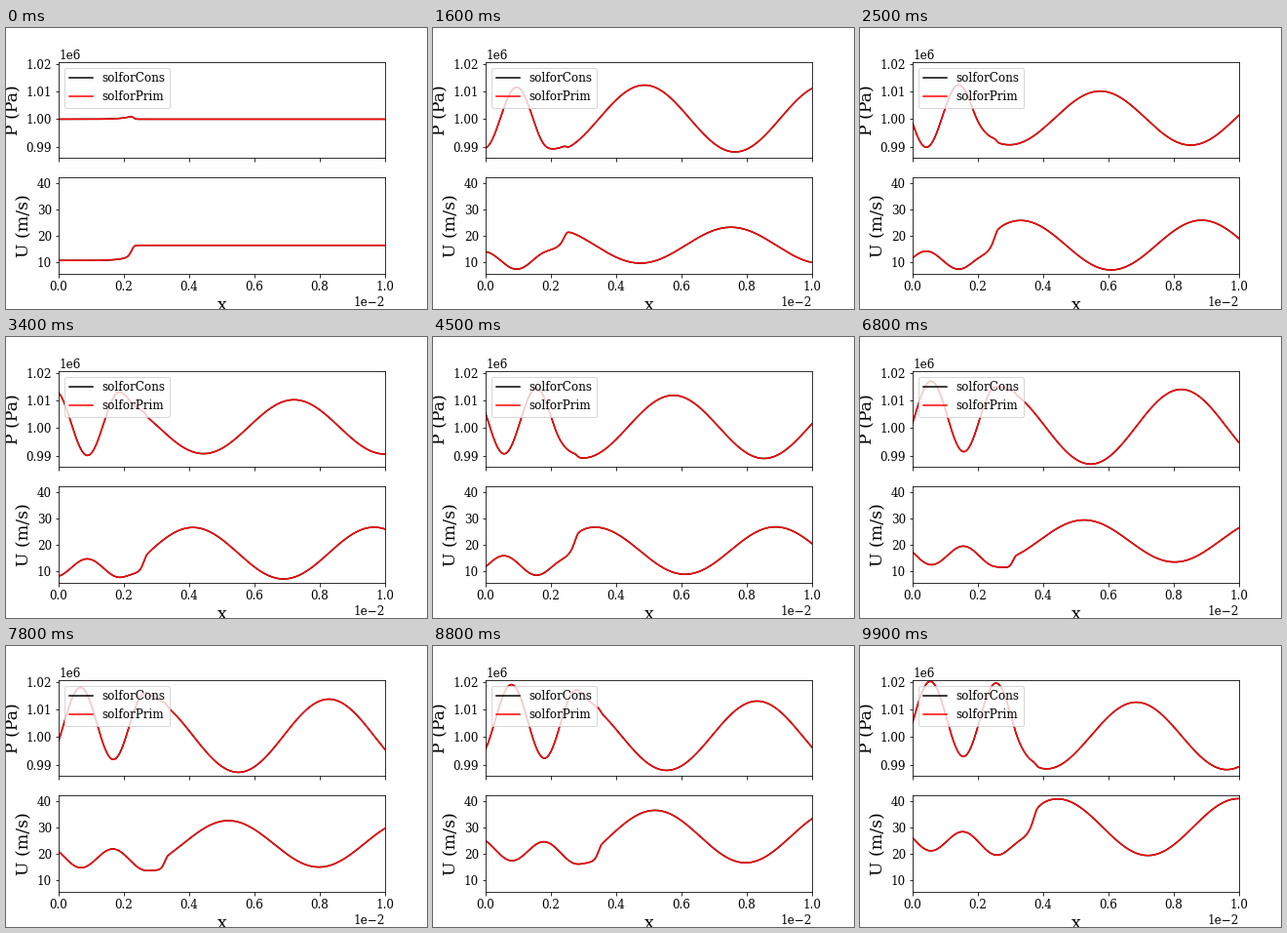
Write a matplotlib script that moves like this. It is 432 px wide and 288 px high and loops after 10 s.

```python
import numpy as np
import matplotlib.pyplot as plt
from matplotlib.animation import FuncAnimation

plt.rcParams.update({
    "font.family": "DejaVu Serif",
    "font.size": 12,
    "figure.subplot.left": 0.125,
    "figure.subplot.right": 0.9,
    "figure.subplot.bottom": 0.125,
    "figure.subplot.top": 0.88,
})

FRAMES = 100
FREQ = 0.2                        # cycles per step
C_COLD, C_HOT = 0.039, 0.111      # wave speeds, cm per step
Z_COLD, Z_HOT = 3350.0, 1200.0    # acoustic impedances
REFLECT, GAIN = 0.21, 1.12
U_IN, U_JUMP = 10.7, 5.75

x = np.linspace(0, 1, 800)        # position in cm


def step(z):
    return 0.5 * (1 + np.tanh(z / 2))


def front(t):
    """Position of the flame front."""
    return 0.232 + 1.1e-3 * t + 8.07e-8 * np.maximum(t - 20, 0) ** 3


def pulse(e):
    """Slowly growing sine that leaves the outlet at e = 0."""
    e = e - 0.08
    amp = 9600 + 26 * np.maximum(e + 7, 0)
    return np.where(e > 0, amp * np.sin(2 * np.pi * FREQ * e), 0)


def incoming(t):
    """Left-running wave, slowed down in the cold gas behind the front."""
    tr = np.full_like(x, t)
    for _ in range(5):
        d = front(tr) - x
        cold = 0.01 * np.logaddexp(0, (d - 0.06) / 0.01)
        tr = t - d / C_HOT - (1 / C_COLD - 1 / C_HOT) * cold
    return pulse(tr + (front(tr) - 1) / C_HOT)


def reflected(t):
    s = front(t)
    return pulse(t - (x - s) / C_HOT + (s - 1) / C_HOT - 0.55)


def fields(t):
    s = front(t)
    a, b = incoming(t), REFLECT * reflected(t)
    hot = step((x - s + 0.02) / 0.012)
    wide = step((x - s + 0.06) / 0.025)
    tail = np.exp(np.minimum(x - s, 0) / 0.028)
    lag = x / 0.043

    p_cold = 75 * np.maximum(t - 8 - lag, 0)
    p_hot = 500 * min(t / 30, 1)
    bump = 1500 * tail * step((s - 0.004 - x) / 0.003)
    p = (1e6 + p_cold * (1 - wide) + p_hot * wide + bump
         + a * (1 + (GAIN - 1) * (1 - hot)) + b * hot)

    rise = 0.0022 * np.maximum(t - 16.5 - lag * (1 - hot) - 3.5 * hot, 0) ** 2
    jump = U_JUMP * (0.55 * step((x - s + 0.01) / 0.0045) + 0.45 * tail)
    wave = (b - a) / Z_HOT * hot - GAIN * a / Z_COLD * (1 - hot)
    return p, U_IN + rise + jump + wave


fig, (ax_p, ax_u) = plt.subplots(2, 1, sharex=True, figsize=(6, 4), dpi=72)
styles = (("solforCons", "black"), ("solforPrim", "red"))
lines_p = [ax_p.plot([], [], color=c, label=n)[0] for n, c in styles]
lines_u = [ax_u.plot([], [], color=c, label=n)[0] for n, c in styles]

ax_p.set_xlim(0, 0.01)
ax_p.set_ylim(0.9859e6, 1.0208e6)
ax_u.set_ylim(5.6, 42.2)
ax_p.ticklabel_format(axis="both", style="sci", scilimits=(0, 0))
ax_u.ticklabel_format(axis="x", style="sci", scilimits=(0, 0))
ax_p.set_yticks([0.99e6, 1.00e6, 1.01e6, 1.02e6])
ax_u.set_yticks([10, 20, 30, 40])
ax_p.set_ylabel("P (Pa)", fontsize="x-large")
ax_u.set_ylabel("U (m/s)", fontsize="x-large")
ax_u.set_xlabel("x", fontsize="x-large")
ax_p.legend(loc="upper left")


def update(i):
    p, u = fields(float(i))
    for line in lines_p:
        line.set_data(x / 100, p)
    for line in lines_u:
        line.set_data(x / 100, u)
    return lines_p + lines_u


anim = FuncAnimation(fig, update, frames=FRAMES, interval=100,
                     repeat=True, repeat_delay=0, blit=False)
plt.show()
```
